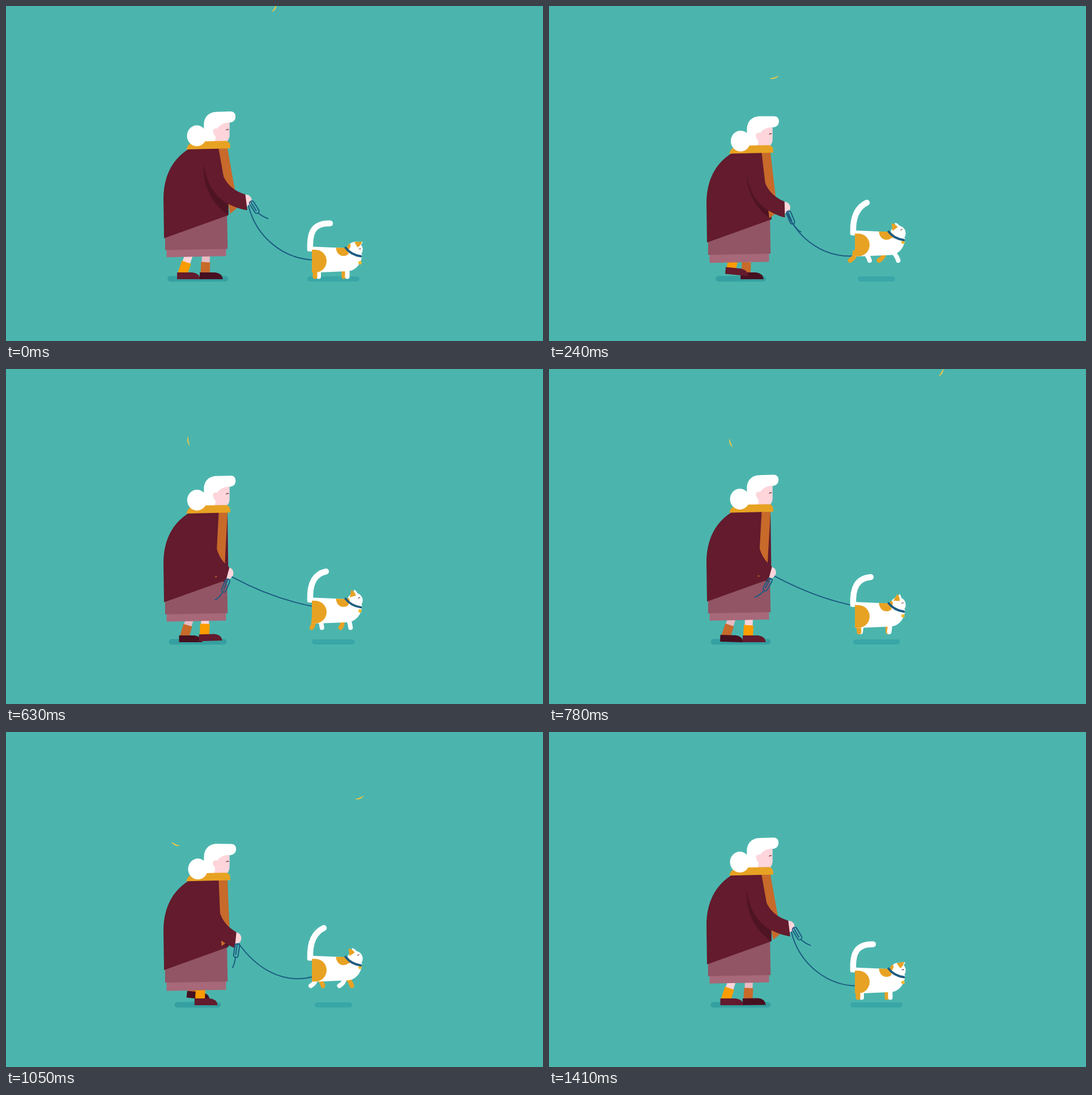
Recreate the animation shown at these times as an HTML page. Size 948x591 px, loop 1.44 s.

```html
<!DOCTYPE html>
<html lang="en">
<head>
<meta charset="utf-8">
<title>Evening walk</title>
<style>
  html, body { margin: 0; width: 100%; height: 100%; overflow: hidden; background: #4bb5ad; }
  svg { display: block; width: 100%; height: 100%; }
  .line { fill: none; stroke: #1d5c82; stroke-width: 2; stroke-linecap: round; }
  .leg { fill: none; stroke-width: 8; stroke-linecap: round; }
  .white { fill: #fff; }
  .skin { fill: #fdd5db; }
  .wine { fill: #631b2d; }
  .amber { fill: #e8a223; }
  .rust { fill: #c76a2a; }
  .leaf { fill: #edc444; }
</style>
</head>
<body>
<svg viewBox="0 0 948 591">
  <rect width="948" height="591" fill="#4bb5ad"/>
  <rect id="ladyShadow" y="476.3" height="10" rx="5" fill="#35a0a1"/>
  <rect id="catShadow" y="477" height="9" rx="4.5" fill="#39a6a7"/>

  <g id="farLeg">
    <path class="shin" stroke="#e8bcc3" stroke-width="14"/>
    <path class="sock" stroke="#c76a2a" stroke-width="16"/>
    <path class="shoe" fill="#471020" d="M0-12H27Q39-11 41 0H0Z"/>
  </g>
  <g id="nearLeg">
    <path class="shin" stroke="#fdd5db" stroke-width="14"/>
    <path class="sock" stroke="#fb9c00" stroke-width="17"/>
    <path class="shoe wine" d="M0-12H27Q39-11 41 0H0Z"/>
  </g>

  <path id="hem" fill="#a76879" d="M283.5 420H388.5V441.3L283.5 443.3Z"/>
  <path id="skirt" fill="#925565" d="M280.8 400L390 360L391.3 428.5L280.8 430.5Z"/>

  <g id="upper">
    <path class="wine" d="M322 252.5C294 270 278 300 278 340L279 409.7L392.6 369L391 250Z"/>
    <path fill="#4f1424" d="M349 278C347 320 365 350 392.6 369V349C370 338 353 312 349 278Z"/>
    <path id="scarfTail" class="rust" d="M375.5 246H391V358L375.5 367Z"/>
    <g id="arm">
      <ellipse class="skin" cx="423.5" cy="343" rx="10.2" ry="10.5"/>
      <path class="wine" d="M364 258L374 275L385 303C393 318 405 327 422.5 332.5L426 360.3C413 358.5 402 354 392 349C370 338 353 312 349 278L350 260Z"/>
    </g>
    <path class="skin" d="M362 200H394.7V229Q394 239 384 242H362Z"/>
    <path fill="none" stroke="#631b2d" stroke-width="1.2" d="M388.7 219.3Q390.2 216.6 393.2 218.2"/>
    <g id="hair">
      <path class="white" d="M349.3 244V210C349.3 196 358 187 372 186.8L395 186C400 185.2 405.2 188 405.2 195C405.2 202 400 206.3 393 205.5C381 206 374 213 370 221L366 226Q374 230 366 244Z"/>
      <circle class="skin" cx="370.3" cy="221" r="5"/>
    </g>
    <path class="amber" d="M318.5 253C320 244 328 239.5 336 239L387 238C394 238 396.5 243 395.8 251.3Z"/>
    <ellipse id="bun" class="white" cx="336.8" cy="229" rx="17.3" ry="18.4"/>
  </g>

  <path id="leash" class="line"/>
  <g id="handle">
    <rect class="line" x="-4" y="0" width="8" height="24" rx="3.5"/>
    <path class="line" d="M-.5 1V19"/>
  </g>
  <path id="loose" class="line"/>

  <g id="cat">
    <path id="tail" fill="none" stroke="#fff" stroke-width="10.5" stroke-linecap="round"/>
    <path class="white" d="M531.8 426H541V433H534Q531.8 433 531.8 430Z"/>
    <path id="backFar" class="leg" stroke="#fff"/>
    <path id="backNear" class="leg" stroke="#e8a223"/>
    <path id="frontFar" class="leg" stroke="#e8a223"/>
    <path id="frontNear" class="leg" stroke="#fff"/>
    <path class="white" d="M540 424.5L599 427L628.5 438C628.5 449 622 465 605 467.8L553 470H540Z"/>
    <path class="amber" d="M540 430H546A20 20 0 0 1 546 470H540Z"/>
    <path class="amber" d="M582.6 426.2C583 444 604 445 607 433L599 426.8Z"/>
    <path id="farEar" class="white" d="M-5 4L0-9Q5-5 6 3Z"/>
    <circle class="white" cx="616.3" cy="429.5" r="13.4"/>
    <path id="ear" class="amber" d="M-5 4L-1-9Q5-5 6 2Z"/>
    <g id="face">
      <ellipse class="amber" cx="-11" cy="-5" rx="2.6" ry="5" transform="rotate(20 -11 -5)"/>
      <path fill="none" stroke="#631b2d" stroke-width="1" d="M6.5-.6Q8.5-2 10.5-.6"/>
    </g>
    <circle id="bell" cx="625" r="3" fill="#f3b92b"/>
    <path fill="none" stroke="#1d5c82" stroke-width="4" stroke-linecap="round" d="M599.5 426.5Q609 439 626.5 441.5"/>
  </g>

  <path class="leaf" id="leafA" d="M-9-1Q0 5.5 9-1.5Q0 .8-9-1Z"/>
  <path class="leaf" id="leafB" d="M-9-1Q0 5.5 9-1.5Q0 .8-9-1Z"/>
</svg>

<script>
const LOOP = 1440, STEP = LOOP / 2, TICK = 30;
const $ = id => document.getElementById(id);
const set = (el, attrs) => { for (const k in attrs) el.setAttribute(k, attrs[k]); };
const move = (id, x, y, rest = '') => set($(id), { transform: `translate(${x} ${y})${rest}` });
const clamp = v => Math.min(1, Math.max(0, v));
const smooth = v => { const s = clamp(v); return s * s * (3 - 2 * s); };
const wave = (t, period = LOOP) => Math.cos(2 * Math.PI * t / period);

// The foot swings forward through the air in one step, then slides back on the ground.
function gait(t) {
  const s = t % STEP / STEP;
  if (t % LOOP >= STEP) return { x: 342 - 40 * smooth(s ** 1.5), lift: 0, tilt: 0 };
  return {
    x: 302 + 40 * smooth((s - .06) / .9),
    lift: 12.5 * Math.sin(Math.PI * s ** 1.15) ** 2,
    tilt: 7 * Math.sin(Math.PI * s) * Math.cos(Math.PI * s * s)
  };
}

function drawLeg(id, t) {
  const { x, lift, tilt } = gait(t);
  const [shin, sock, shoe] = $(id).children;
  const lean = 1 + 6 * ((342 - x) / 40) ** 2;
  const ax = x + 9.5 + tilt * .15, ay = 473 - lift;
  const bone = k => `M${ax} ${ay}L${ax + lean * k} ${ay - 21 * k}`;
  set(shin, { d: bone(2) });
  set(sock, { d: bone(1) });
  set(shoe, { transform: `translate(${x} ${482 - lift}) rotate(${tilt} 20 0)` });
}

function drawLady(t, bob) {
  const swing = wave(t), k = bob / 10.5;
  set($('ladyShadow'), { x: 285 + 13 * k, width: 107 - 26 * k });
  drawLeg('nearLeg', t);
  drawLeg('farLeg', t + STEP);
  move('hem', 0, bob * 1.33);
  move('skirt', 0, bob * 1.15);
  move('upper', 0, bob);
  move('bun', 2 * k, 2.6 * k);
  set($('hair'), { transform: `rotate(${3 * k} 368 215)` });
  set($('scarfTail'), { transform: `rotate(${-3.3 - 6.8 * swing} 383 252)` });
  set($('arm'), { transform: `rotate(${11.5 * (1 - swing)} 368 268.5)` });
}

// The handle trails the hand a little; the slack in the leash runs ahead of it.
function drawLeash(t, bob) {
  const swing = wave(t), slack = wave(t + 50), arc = 1 - swing * swing;
  const angle = -2 - 31 * wave(t - 50);
  const hx = 411.5 + 20.5 * swing, hy = 357 - 12.3 * swing + 5 * arc + bob;
  const hang = (deg, len) => {
    const r = deg * Math.PI / 180;
    return [hx - len * Math.sin(r), hy + len * Math.cos(r)];
  };
  const [tx, ty] = hang(angle, 24), [lx, ly] = hang(angle * 1.4, 43);
  move('handle', hx, hy, ` rotate(${angle})`);
  set($('loose'), { d: `M${tx} ${ty}Q${(tx + lx) / 2} ${ly - 3} ${lx} ${ly}` });

  const sx = 413 + 15 * swing, sy = 358.5 - 6.5 * swing + 4 * arc + bob;
  const y1 = 396 + 10 * slack + 1.8 * bob, y2 = 426 + 21 * slack + 1.9 * bob;
  set($('leash'), { d: `M${sx} ${sy}C441 ${y1} 488 ${y2} 544 ${433 + 15 * swing}` });
}

function drawPaw(id, x, s) {
  const knee = x + .6 * s + .3 * Math.abs(s);
  set($(id), { d: `M${x + s * .4} 463Q${knee} 471.5 ${x + s} 477.5` });
}

function drawCat(t) {
  const s = t % STEP / STEP;
  const rise = 1 - Math.abs(2 * s - 1) ** 3.7;
  const flex = clamp((rise - .27) / .6), perk = Math.sqrt(flex);
  const swing = 14 * flex * flex * (t < STEP ? 1 : -1);
  const half = 46 - 13 * flex;
  set($('catShadow'), { x: 578 - half, width: 2 * half });
  move('cat', 0, -rise * (27 + 6 * s));
  const tx = 572 - 11 * flex, ty = 383.5 - 8 * flex;
  set($('tail'), { d: `M537 428C536 400 ${542 + 3.3 * flex} 383 ${tx} ${ty}` });
  drawPaw('backFar', 552, swing);
  drawPaw('backNear', 545.5, -swing);
  drawPaw('frontFar', 596.5, -swing);
  drawPaw('frontNear', 602.5, swing);
  const ex = 620.3 - 11 * perk, turn = ` rotate(${72 - 97 * perk})`;
  move('ear', ex, 419.5, turn);
  move('farEar', ex + 1 + 4 * perk, 419, turn);
  move('face', 616.3, 429.5, ` rotate(${-42 * flex})`);
  set($('bell'), { cy: 453 - 8 * rise });
}

// Swoops in, hovers, then sinks again.
function drawLeaf(id, age, dx, dy, scale) {
  const glide = Math.max(0, 1 - age / 600) ** 1.36;
  const drop = Math.max(0, 1 - age / 260) ** 2;
  const sink = Math.max(0, (age - 700) / 350) ** 2;
  const x = 322 + 152 * glide - 23 * sink + dx;
  const y = 127 - 123 * drop + 71 * sink + dy;
  const angle = 12 - 70 * wave(age, 1300) + 40 * sink;
  move(id, x, y, ` rotate(${angle}) scale(${clamp(scale)})`);
}

function draw(t) {
  const bob = 5.25 * (1 - wave(t - 10, STEP));
  drawLady(t, bob);
  drawLeash(t, bob);
  drawCat(t);
  drawLeaf('leafA', t, 0, 0, (1140 - t) / 90);
  drawLeaf('leafB', (t - 765) * .8, 223, -9, (LOOP - t) / 400);
}

const start = performance.now();
function tick() {
  const t = Math.max(0, performance.now() - start);
  draw(Math.floor(t / TICK) * TICK % LOOP);
  requestAnimationFrame(tick);
}
tick();
</script>
</body>
</html>
```
